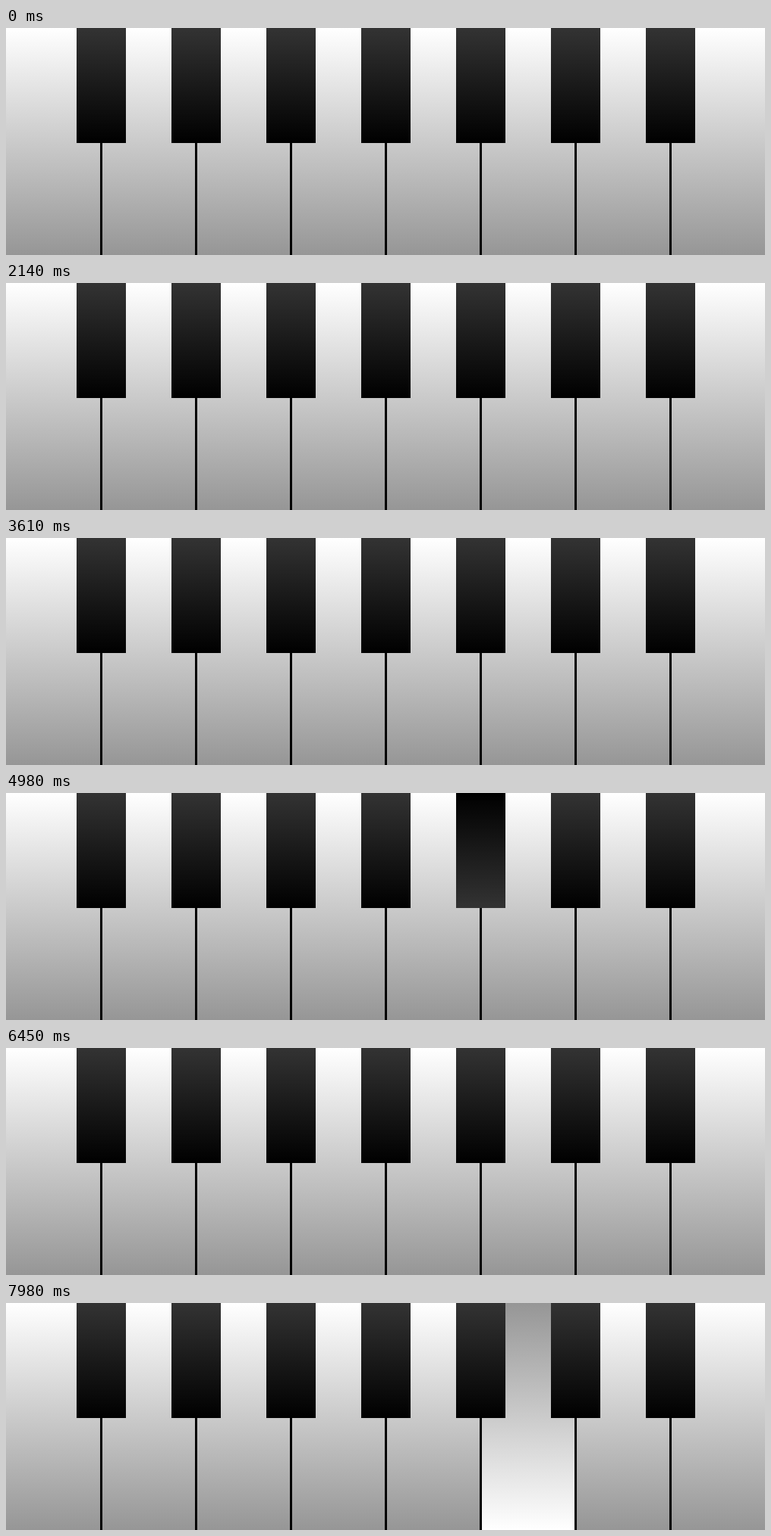
Animation of 1000 by 300 pixels, one loop 8000 ms. Source, as an HTML page:

```html
<!DOCTYPE html>
<html lang="en">
<head>
<meta charset="utf-8">
<title>Piano</title>
<style>
  html, body { margin: 0; width: 100%; height: 100%; overflow: hidden; background: #000; }
  #piano { position: relative; width: 1000px; height: 300px; overflow: hidden; background: #000; }
  .key { position: absolute; top: 0; background: linear-gradient(var(--dir, to bottom), var(--from), var(--to)); }
  .white { width: 122px; height: 300px; --from: #fff; --to: #969696; }
  .black { width: 65px; height: 152px; --from: #333; --to: #000; }
  .pressed { --dir: to top; }
</style>
</head>
<body>
<div id="piano"></div>
<script>
const LOOP = 8000;
const PITCH = 125;
const piano = document.getElementById('piano');

// [key, press time, release time]; w = white, b = black, counted from the left.
const notes = [
  ['w1', 1610, 1760], ['w2', 1610, 1850],
  ['w4', 2110, 2140], ['w6', 2450, 2660],
  ['b6', 3100, 3200], ['b4', 3530, 3610],
  ['b2', 3940, 4040], ['b1', 3940, 4140],
  ['b4', 4590, 4620], ['b4', 4980, 5160],
  ['b1', 5570, 5820], ['b4', 5970, 6250],
  ['b1', 6320, 6450], ['b6', 7060, 7310],
  ['w2', 7470, 7780], ['w5', 7980, 8000]
];

const keys = {};
function addKey(name, type, left, width) {
  const key = document.createElement('div');
  key.className = 'key ' + type;
  key.style.left = left + 'px';
  if (width) key.style.width = width + 'px';
  piano.append(key);
  keys[name] = key;
}

for (let i = 0; i < 8; i++) {
  const left = i ? i * PITCH + 2 : 0;
  const right = i < 7 ? (i + 1) * PITCH - 1 : 1000;
  addKey('w' + i, 'white', left, right - left);
}
for (let i = 0; i < 7; i++) addKey('b' + i, 'black', 93 + i * PITCH);

function draw(now) {
  const t = now % LOOP;
  const held = new Set(notes.filter(n => t >= n[1] && t < n[2]).map(n => n[0]));
  for (const name in keys) keys[name].classList.toggle('pressed', held.has(name));
}

const start = performance.now();
function tick() {
  draw(performance.now() - start);
  requestAnimationFrame(tick);
}
tick();
</script>
</body>
</html>
```
